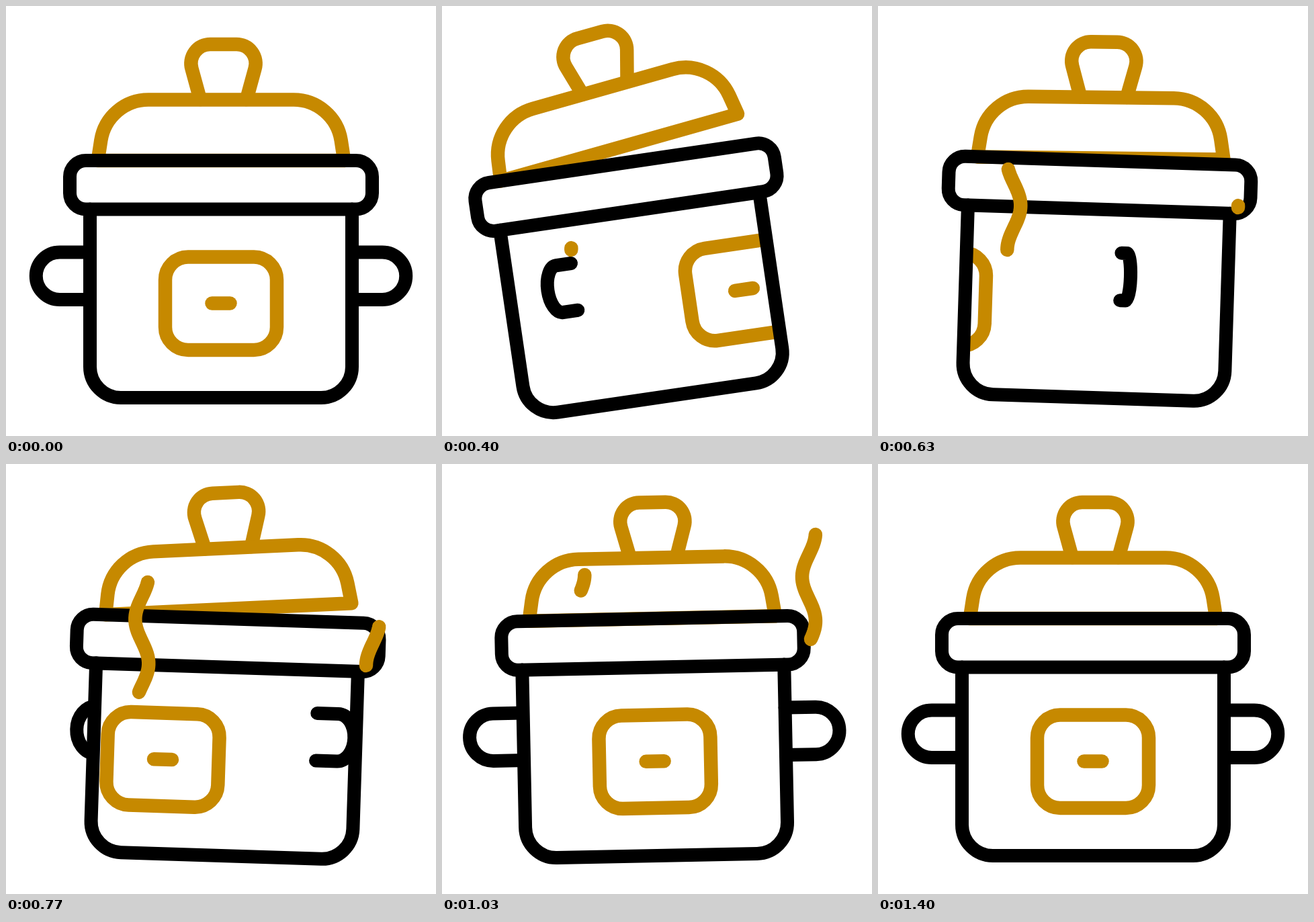
An HTML page with a canvas that plays this animation: 640 px wide and 640 px high, repeating every 1.67 s.

```html
<!DOCTYPE html>
<html lang="en">
<head>
<meta charset="utf-8">
<title>Cooking pot</title>
<style>
  html, body { margin: 0; overflow: hidden; background: #fff; }
  canvas { display: block; }
</style>
</head>
<body>
<canvas id="stage" width="640" height="640"></canvas>
<script>
const ctx = document.getElementById('stage').getContext('2d');
const BLACK = '#000', GOLD = '#c68900';
const LOOP = 1670, FPS = 30;

const lid = new Path2D('M136.7 230L141.3 200A71.5 71.5 0 0 1 212 139.5H428A71.5 71.5 0 0 1 498.7 200L503.3 230Z');
const knob = new Path2D('M289 139L276.5 93.4A28.5 28.5 0 0 1 304 57H343A28.5 28.5 0 0 1 370.5 93.4L358 139');
const body = new Path2D('M125 302.5V537A46 46 0 0 0 171 583H469A46 46 0 0 0 515 537V302.5');
const handle = new Path2D('M195 366.5H240A35.25 35.25 0 0 1 240 437H195');
const dash = new Path2D('M306.5 442.5H333.5');
const band = roundRect(95, 230, 450, 72.5, 24);
const panel = roundRect(237, 373.5, 166, 138.5, 34);

// Keys are [frame, value] pairs joined with smooth easing.
const tiltKeys = [[7.2, 0], [12.6, -8.66], [20.7, 3.15], [28, -2.4], [33.9, 0]];
const lidKeys = [[7.4, 0], [14, -9.5], [20.4, 0], [24.8, -7.1], [29.5, 0]];
const frontKeys = [[8, -1], [16, 0], [27, 1]];
const backKeys = [[8, -1], [16, 0], [25.8, 1]];

function roundRect(x, y, w, h, r) {
  const path = new Path2D();
  path.roundRect(x, y, w, h, r);
  return path;
}

function ease(frame, from, to) {
  const u = Math.min(1, Math.max(0, (frame - from) / (to - from)));
  return u * u * (3 - 2 * u);
}

function tween(frame, keys) {
  let value = keys[0][1];
  for (let i = 1; i < keys.length; i++) {
    value += (keys[i][1] - keys[i - 1][1]) * ease(frame, keys[i - 1][0], keys[i][0]);
  }
  return value;
}

function stroke(path, color) {
  ctx.strokeStyle = color;
  ctx.lineWidth = color === GOLD ? 20.5 : 20;
  ctx.stroke(path);
}

function rotateAbout(x, y, degrees) {
  ctx.translate(x, y);
  ctx.rotate(degrees * Math.PI / 180);
  ctx.translate(-x, -y);
}

function drawLid(angle) {
  ctx.save();
  rotateAbout(136.7, 230, angle);
  stroke(knob, GOLD);
  stroke(lid, GOLD);
  ctx.restore();
}

// side runs from -1 (left) through 0 (edge-on) to 1 (right)
function drawHandle(side) {
  const path = new Path2D();
  path.addPath(handle, new DOMMatrix([side || 0.002, 0, 0, 1, 320, 0]));
  stroke(path, BLACK);
}

function drawPanel(side) {
  ctx.save();
  ctx.beginPath();
  ctx.rect(125, 302, 390, 281);
  ctx.clip();
  ctx.translate(303 * (side < 0 ? side + 1 : side - 1), 0);
  stroke(panel, GOLD);
  stroke(dash, GOLD);
  ctx.restore();
}

function drawSteam(x, y, frame) {
  const head = ease(frame, 11, 25), tail = ease(frame, 20, 34);
  if (head <= tail) return;
  const path = new Path2D();
  const steps = 40;
  for (let i = 0; i <= steps; i++) {
    const p = tail + (head - tail) * i / steps;
    path.lineTo(x - 10 * Math.cos(3 * Math.PI * p), y - 198 * p);
  }
  stroke(path, GOLD);
}

function draw(frame) {
  const front = tween(frame, frontKeys);
  ctx.fillStyle = '#fff';
  ctx.fillRect(0, 0, 640, 640);
  ctx.lineCap = ctx.lineJoin = 'round';

  ctx.save();
  rotateAbout(320, 583, tween(frame, tiltKeys));
  drawLid(tween(frame, lidKeys));
  drawHandle(-tween(frame, backKeys));
  ctx.fill(body);
  drawPanel(front);
  stroke(body, BLACK);
  stroke(band, BLACK);
  drawHandle(front);
  ctx.restore();

  drawSteam(202.3, 363, frame);
  drawSteam(546, 300, frame - 7);
}

function tick() {
  const time = performance.now() % LOOP;
  draw(Math.floor((time + 5) * FPS / 1000));
  requestAnimationFrame(tick);
}
tick();
</script>
</body>
</html>
```
